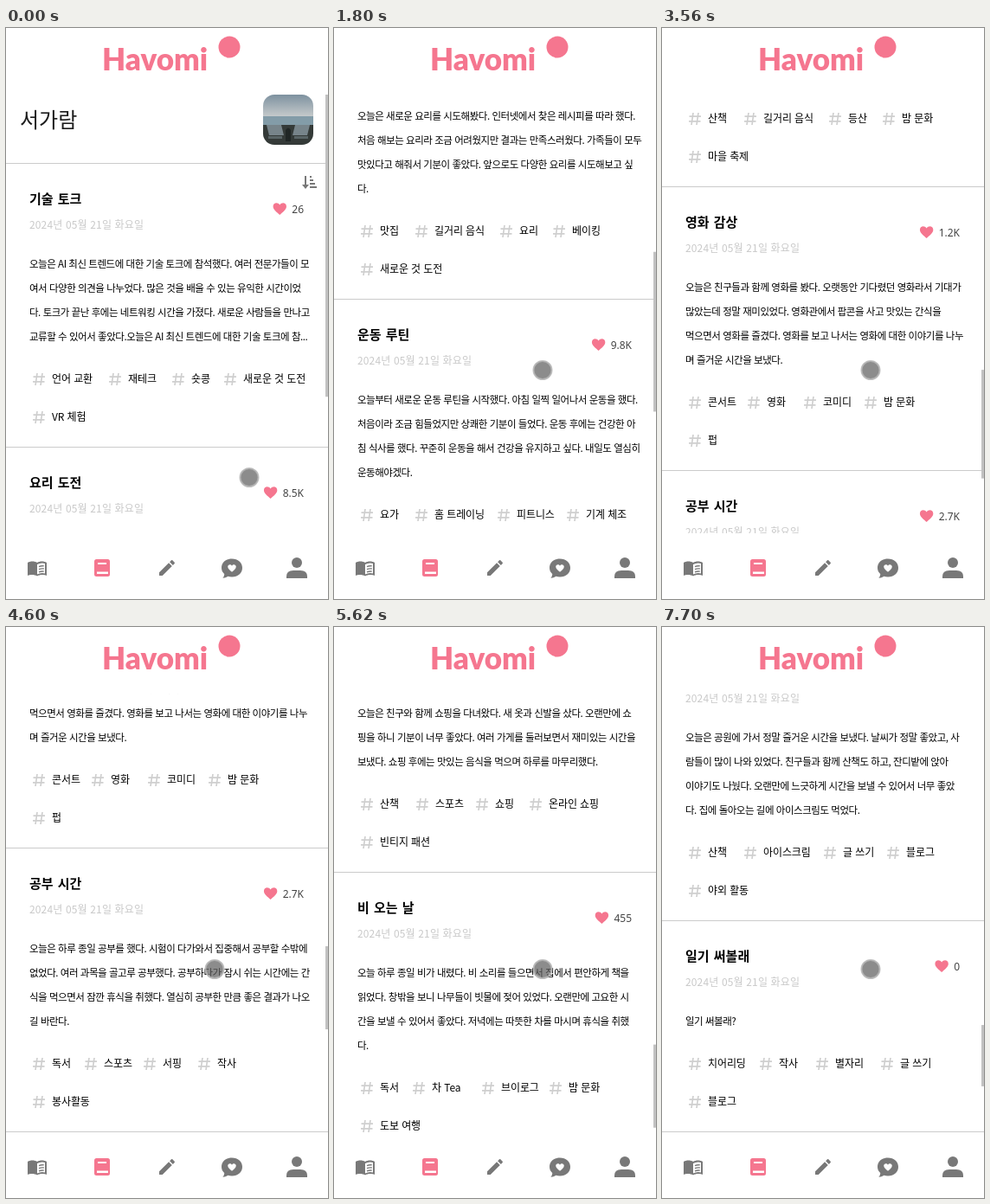
Recreate the animation shown at these times as an HTML page. Size 372x660 px, loop 8 s.

```html
<!DOCTYPE html>
<html lang="ko">
<head>
<meta charset="utf-8">
<title>Diary feed</title>
<style>
  html, body { margin: 0; width: 100%; height: 100%; overflow: hidden; background: #fff; }
  svg { display: block; width: 372px; height: 660px; }
  text { font-family: "Noto Sans CJK KR", "Noto Sans CJK", "Noto Sans", sans-serif; fill: #000; white-space: pre; }
  .brand { font: 900 35px Lato, sans-serif; fill: #f5768f; }
  .user { font-size: 24px; fill: #1c1c1c; }
  .title { font-size: 15px; font-weight: 700; word-spacing: 1px; }
  .date { font-size: 12px; font-weight: 500; letter-spacing: .15px; fill: #c9c9c9; }
  .body { font-size: 11.5px; font-weight: 500; letter-spacing: -.46px; }
  .tag { font-size: 12px; font-weight: 500; letter-spacing: -.1px; }
  .count { font: 12px "Noto Sans", sans-serif; fill: #444; text-anchor: end; }
  .rule { fill: #cbcbcb; }
  .hash { fill: none; stroke: #cfcfcf; stroke-width: 1.7; }
  .pink { fill: #f5768f; }
  .grey { fill: #787878; }
</style>
</head>
<body>
<svg viewBox="0 0 372 660">
  <defs>
    <clipPath id="view"><rect y="77" width="372" height="507"/></clipPath>
    <clipPath id="round"><rect x="297" y="77" width="58" height="58" rx="13"/></clipPath>
    <linearGradient id="sky" x2="0" y2="1">
      <stop offset="0" stop-color="#7d919f"/>
      <stop offset="1" stop-color="#cdd0d0"/>
    </linearGradient>
    <path id="heart" d="M0 7C-3 4-7.7 1-7.7-2.8C-7.7-7.4-2-8.2 0-4.4C2-8.2 7.7-7.4 7.7-2.8C7.7 1 3 4 0 7Z"/>
    <path id="hash" d="M-2-7L-4 7M4-7L2 7M-6.5-2.8H7M-7 2.8H6.5"/>
  </defs>
  <rect width="372" height="660" fill="#fff"/>

  <g clip-path="url(#view)">
    <g id="feed">
      <text class="user" x="16" y="115">서가람</text>
      <g clip-path="url(#round)">
        <rect x="297" y="77" width="58" height="28" fill="url(#sky)"/>
        <rect x="297" y="102" width="58" height="12" fill="#839ca8"/>
        <rect x="297" y="112" width="58" height="23" fill="#343a38"/>
        <path d="M301 112h17l3 12h-17zM334 112h17l-3 12h-17z" fill="#77848a"/>
        <path d="M303 125h16v3h-16zM333 125h16v3h-16z" fill="#596466"/>
        <path d="M323 131v-13q3-5 6 0v13z" fill="#202625"/>
      </g>
      <rect class="rule" y="156" width="372" height="1"/>
      <path class="grey" d="M345 171h2v10h3l-4 5-4-5h3zM351 171h2v2h-2zM351 175h4v2h-4zM351 179h6v2h-6zM351 183h8v2h-8z"/>
    </g>
  </g>
  <rect id="thumb" x="369" width="3" fill="#c1c1c1"/>

  <text class="brand" x="111" y="49">Havomi</text>
  <circle class="pink" cx="258" cy="22" r="12.5"/>

  <g class="grey">
    <path transform="translate(24 612)" fill-rule="evenodd" d="M1 6C4 4 9 4 12 6C15 4 20 4 23 6V21C20 19.5 15 19.5 12 21.5C9 19.5 4 19.5 1 21ZM21 7C18 6 15 6.5 12 8V19.5C15 18 18 17.5 21 18.5Z"/>
    <path d="M38 622.6q3-1.2 5.8-.7M38 625.7q3-1.2 5.8-.7M38 628.8q3-1.2 5.8-.7" fill="none" stroke="#787878" stroke-width="1.4"/>
    <path transform="translate(174 612)" d="M3 17.25V21h3.75L17.8 9.95l-3.75-3.75ZM20.7 7.05q.6-.7 0-1.4l-2.35-2.35q-.7-.6-1.4 0l-1.85 1.85 3.75 3.75Z"/>
    <path d="M261 613.5c7 0 12 4.6 12 10.5s-5 10.500-12 10.500q-2.500 0-4.600-.7q-2.600 2-6 1.900q1.700-1.800 1.900-4.500q-3.300-3-3.300-7.200c0-5.900 5-10.500 12-10.500z"/>
    <circle cx="336" cy="618" r="6"/>
    <path d="M324 636v-2q0-7 8-7h8q8 0 8 7v2z"/>
  </g>
  <use href="#heart" fill="#fff" transform="translate(261 624.5) scale(.62)"/>
  <rect class="pink" x="102" y="614" width="18" height="20" rx="2.5"/>
  <path d="M106 618h10v2h-10zM105 628.500h13v2.500h-13z" fill="#fff"/>

  <circle id="cursor" r="10.500" fill="#606060" fill-opacity=".72" stroke="#b4b4b4" stroke-opacity=".85" stroke-width="2"/>
</svg>

<script>
const NS = "http://www.w3.org/2000/svg";
const TOP = 77, VIEW = 507, LOOP = 8000;
const feed = document.getElementById("feed");
const thumb = document.getElementById("thumb");
const cursor = document.getElementById("cursor");

// Each entry: title, likes, body lines, tags, x of the tags in the first row
const entries = [
  ["기술 토크", "26", [
    "오늘은 AI 최신 트렌드에 대한 기술 토크에 참석했다. 여러 전문가들이 모",
    "여서 다양한 의견을 나누었다. 많은 것을 배울 수 있는 유익한 시간이었",
    "다. 토크가 끝난 후에는 네트워킹 시간을 가졌다. 새로운 사람들을 만나고",
    "교류할 수 있어서 좋았다.오늘은 AI 최신 트렌드에 대한 기술 토크에 참..."],
    "언어 교환,재테크,숏콩,새로운 것 도전,VR 체험", [38, 126, 199, 259]],
  ["요리 도전", "8.5K", [
    "오늘은 새로운 요리를 시도해봤다. 인터넷에서 찾은 레시피를 따라 했다.",
    "처음 해보는 요리라 조금 어려웠지만 결과는 만족스러웠다. 가족들이 모두",
    "맛있다고 해줘서 기분이 좋았다. 앞으로도 다양한 요리를 시도해보고 싶",
    "다."],
    "맛집,길거리 음식,요리,베이킹,새로운 것 도전", [38, 101, 199, 260]],
  ["운동 루틴", "9.8K", [
    "오늘부터 새로운 운동 루틴을 시작했다. 아침 일찍 일어나서 운동을 했다.",
    "처음이라 조금 힘들었지만 상쾌한 기분이 들었다. 운동 후에는 건강한 아",
    "침 식사를 했다. 꾸준히 운동을 해서 건강을 유지하고 싶다. 내일도 열심히",
    "운동해야겠다."],
    "요가,홈 트레이닝,피트니스,기계 체조,새로운 것 도전", [38, 101, 196, 276]],
  ["가족 시간", "584", [
    "오늘은 가족 모임이 있었다. 오랜만에 가족들이 모두 모여서 즐거운 시간을",
    "보냈다. 맛있는 음식을 나눠 먹으며 여러 가지 이야기를 나눴다. 가족들",
    "과 함께 시간을 보내니 마음이 따뜻해졌다. 저녁에는 가족들과 함께 산",
    "책을 했다."],
    "산책,길거리 음식,등산,밤 문화,마을 축제", [38, 102, 200, 262]],
  ["영화 감상", "1.2K", [
    "오늘은 친구들과 함께 영화를 봤다. 오랫동안 기다렸던 영화라서 기대가",
    "많았는데 정말 재미있었다. 영화관에서 팝콘을 사고 맛있는 간식을",
    "먹으면서 영화를 즐겼다. 영화를 보고 나서는 영화에 대한 이야기를 나누",
    "며 즐거운 시간을 보냈다."],
    "콘서트,영화,코미디,밤 문화,펍", [38, 106, 171, 241]],
  ["공부 시간", "2.7K", [
    "오늘은 하루 종일 공부를 했다. 시험이 다가와서 집중해서 공부할 수밖에",
    "없었다. 여러 과목을 골고루 공부했다. 공부하다가 잠시 쉬는 시간에는 간",
    "식을 먹으면서 잠깐 휴식을 취했다. 열심히 공부한 만큼 좋은 결과가 나오",
    "길 바란다."],
    "독서,스포츠,서핑,작사,봉사활동", [38, 98, 166, 229]],
  ["쇼핑 나들이", "312", [
    "오늘은 친구와 함께 쇼핑을 다녀왔다. 새 옷과 신발을 샀다. 오랜만에 쇼",
    "핑을 하니 기분이 너무 좋았다. 여러 가게를 둘러보면서 재미있는 시간을",
    "보냈다. 쇼핑 후에는 맛있는 음식을 먹으며 하루를 마무리했다."],
    "산책,스포츠,쇼핑,온라인 쇼핑,빈티지 패션", [38, 102, 171, 233]],
  ["비 오는 날", "455", [
    "오늘 하루 종일 비가 내렸다. 비 소리를 들으면서 집에서 편안하게 책을",
    "읽었다. 창밖을 보니 나무들이 빗물에 젖어 있었다. 오랜만에 고요한 시",
    "간을 보낼 수 있어서 좋았다. 저녁에는 따뜻한 차를 마시며 휴식을 취했",
    "다."],
    "독서,차 Tea,브이로그,밤 문화,도보 여행", [38, 98, 178, 256]],
  ["첫 번째 일기", "45", [
    "오늘은 공원에 가서 정말 즐거운 시간을 보냈다. 날씨가 정말 좋았고, 사",
    "람들이 많이 나와 있었다. 친구들과 함께 산책도 하고, 잔디밭에 앉아",
    "이야기도 나눴다. 오랜만에 느긋하게 시간을 보낼 수 있어서 너무 좋았",
    "다. 집에 돌아오는 길에 아이스크림도 먹었다."],
    "산책,아이스크림,글 쓰기,블로그,야외 활동", [38, 102, 194, 267]],
  ["일기 써볼래", "0", ["일기 써볼래?"],
    "치어리딩,작사,별자리,글 쓰기,블로그", [38, 120, 185, 260]]
];

function add(name, attrs, content = "") {
  const el = document.createElementNS(NS, name);
  for (const key in attrs) el.setAttribute(key, attrs[key]);
  el.textContent = content;
  return feed.appendChild(el);
}

const label = (cls, x, y, content) => add("text", { class: cls, x, y }, content);

function addEntry(top, [title, likes, lines, tags, xs]) {
  label("title", 27, top + 47, title);
  label("date", 27, top + 76, "2024년 05월 21일 화요일");
  const count = label("count", 344, top + 58, likes);
  const heartX = 330 - count.getComputedTextLength();
  add("use", { href: "#heart", class: "pink", transform: `translate(${heartX} ${top + 53})` });
  lines.forEach((line, i) => label("body", 27, top + 121 + 28 * i, line));

  const row = top + 142 + 28 * lines.length;
  tags.split(",").forEach((tag, i) => {
    const x = i < 4 ? xs[i] : 38, y = i < 4 ? row : row + 44;
    add("use", { href: "#hash", class: "hash", transform: `translate(${x} ${y - 4})` });
    label("tag", x + 15, y, tag);
  });
  const bottom = row + 74;
  add("rect", { class: "rule", y: bottom, width: 372, height: 1 });
  return bottom;
}

entries.reduce(addEntry, 156);

// Wheel gestures: start, end, scroll position reached
const gestures = [
  [540, 860, 229], [930, 1200, 329], [1590, 1978, 629], [2320, 2700, 885],
  [3070, 3560, 1285], [3930, 4270, 1541], [4600, 5080, 1941], [5300, 5710, 2169],
  [5780, 6160, 2269], [6530, 6920, 2569], [7310, 7695, 2741]
];

// More entries load at the bottom: time, content height
const loads = [[0, 736], [890, 1392], [2700, 2048], [4270, 2676], [5740, 3248], [7695, 3628]];

function ease(t, start, end) {
  const p = Math.min(1, Math.max(0, (t - start) / (end - start)));
  return p * p * (3 - 2 * p);
}

function scrollAt(t) {
  let pos = 0;
  for (const [start, end, to] of gestures) pos += (to - pos) * ease(t, start, end);
  return Math.round(pos);
}

function render(t) {
  const scroll = scrollAt(t);
  const height = loads.filter(([at]) => t >= at).pop()[1];
  feed.setAttribute("transform", `translate(0 ${-scroll})`);
  thumb.setAttribute("y", TOP + scroll * VIEW / height);
  thumb.setAttribute("height", VIEW * VIEW / height);

  const move = ease(t, 0, 250);
  cursor.setAttribute("cx", 281 - 40 * move);
  cursor.setAttribute("cy", 519.5 - 124 * move);
}

const began = performance.now();
function tick() {
  render((performance.now() - began) % LOOP);
  requestAnimationFrame(tick);
}
tick();
</script>
</body>
</html>
```
